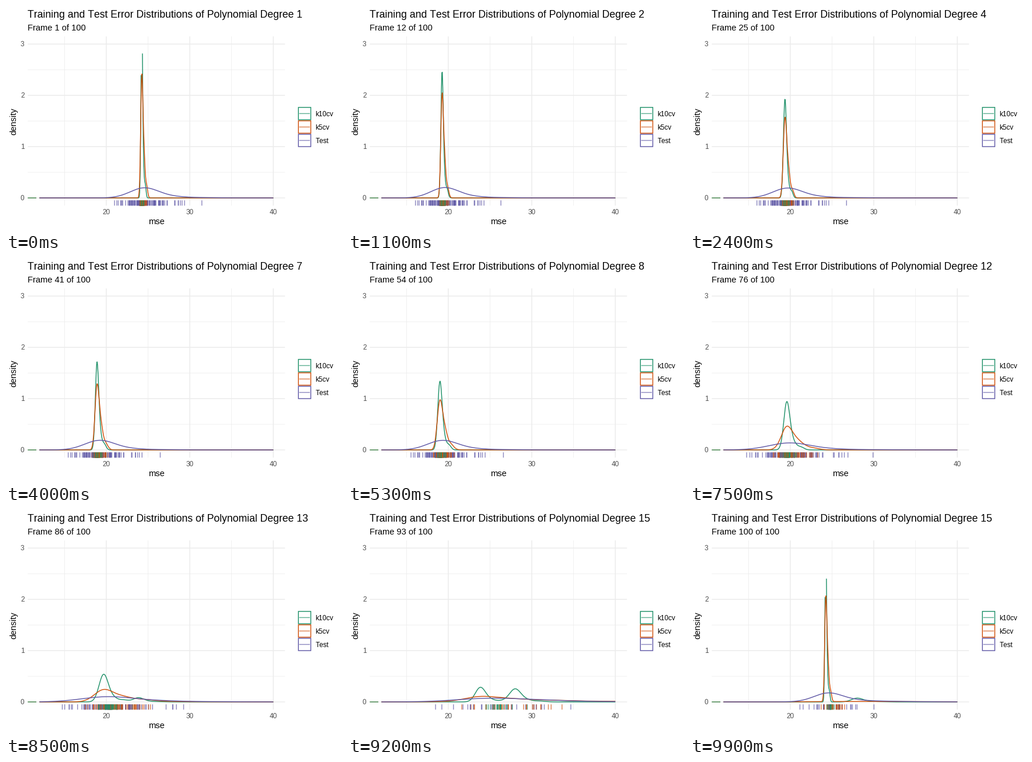
These frames come from a looping animation (576x384 px, 10 s). A matplotlib script:

```python
import numpy as np
import matplotlib.pyplot as plt
from matplotlib.animation import FuncAnimation
from matplotlib.collections import LineCollection
from matplotlib.colors import to_rgba
from matplotlib.patches import Rectangle

plt.rcParams["font.family"] = "Liberation Sans"
plt.rcParams["text.kerning_factor"] = 6

W, H, DPI = 576, 384, 96
FRAMES, DEGREES, REPS = 100, 15, 100
LEFT, RIGHT, TOP, BOTTOM = 37.3, 478.3, 52.1, 342.2
X_MIN, X_MAX, Y_MAX = 12, 40, 3
LINE = 1.42 * 0.75
GRID, GREY = "#EBEBEB", "#4D4D4D"
COLORS = {"k10cv": "#1E9068", "k5cv": "#CF4F0A", "Test": "#5F58A6"}

# error level and peak density at a few degrees, interpolated in between
KNOTS = [1, 2, 4, 6, 8, 10, 13, 15]
CENTRE = [24.25, 19.25, 19.36, 18.87, 18.97, 19.45, 19.68, 28]
PEAK = {"k10cv": [3.6, 2.5, 1.9, 1.8, 1.38, 1.43, .62, .5],
        "k5cv": [2.3, 2, 1.5, 1.32, .97, .72, .27, .06],
        "Test": [.195, .2, .19, .185, .185, .175, .11, .07]}
# offset of the centre, area of the main bump, shoulder and tail heights
SHAPE = {"k10cv": (0, .34, .15, .07),
         "k5cv": (0, .3, .35, .1),
         "Test": (.3, .33, .12, .03)}

grid = np.linspace(X_MIN, X_MAX, 512)


def px(x):
    return LEFT + (RIGHT - LEFT) * ((x - X_MIN) / (X_MAX - X_MIN) + .05) / 1.1


def py(y):
    return BOTTOM - (BOTTOM - TOP) * (y / Y_MAX + .05) / 1.1


def density(name, degree):
    offset, area, shoulder, tail = SHAPE[name]
    peak = np.interp(degree, KNOTS, PEAK[name])
    sd = area / peak
    z = (grid - np.interp(degree, KNOTS, CENTRE) - offset) / sd
    return peak * (np.exp(-z ** 2 / 2)
                   + shoulder * np.exp(-(z - 2) ** 2 / 2)
                   + tail * np.exp(-(z - 4.4) ** 2 / 2))


def build_data():
    rng = np.random.default_rng(17)
    curves, marks = {}, {}
    for name in COLORS:
        ranks = rng.uniform(.005, .995, REPS)
        for d in range(1, DEGREES + 1):
            y = density(name, d)
            kept = int(np.interp(d, [12, 14, 15], [REPS, 80, 25]))
            marks[name, d] = np.interp(ranks[:kept], np.cumsum(y) / y.sum(), grid)
            # values above the y limit leave a gap in the line
            curves[name, d] = np.where(y > Y_MAX, np.nan, y)
    return curves, marks


def build_timeline():
    steps = []
    for d in range(1, DEGREES + 1):
        nxt = d % DEGREES + 1
        steps += [(d, nxt, 0, d)] * (4 if d <= 10 else 3)
        for t in (.25, .5, .75):
            ease = (1 - np.cos(np.pi * t)) / 2
            shown = min(d + 1, DEGREES) if t >= .5 else d
            steps.append((d, nxt, ease, shown))
    return steps


def tween(a, b, ease):
    if ease == 0:
        return a
    n = min(len(a), len(b))
    return a[:n] + (b[:n] - a[:n]) * ease


curves, marks = build_data()
timeline = build_timeline()

fig = plt.figure(figsize=(W / DPI, H / DPI), dpi=DPI, facecolor="white")
ax = fig.add_axes([0, 0, 1, 1])
ax.set_xlim(0, W)
ax.set_ylim(H, 0)
ax.axis("off")


def segment(x, y, color, width=LINE, **kw):
    return ax.plot(x, y, color=color, lw=width, solid_capstyle="butt",
                   snap=False, **kw)[0]


def label(x, y, text, size, color="black", **kw):
    return ax.text(x, y, text, fontsize=size, color=color, **kw)


def draw_axes():
    for v in range(15, 41, 5):
        major = v % 10 == 0
        segment([px(v)] * 2, [TOP, BOTTOM], GRID, LINE if major else LINE / 2)
        if major:
            label(px(v), 357, str(v), 8.8, GREY, ha="center")
    for k in range(7):
        y, major = py(k / 2), k % 2 == 0
        segment([LEFT, RIGHT], [y, y], GRID, LINE if major else LINE / 2)
        if major:
            label(31.5, y + 4.2, str(k // 2), 8.8, GREY, ha="right")
    label((LEFT + RIGHT) / 2, 374, "mse", 11, ha="center")
    label(17.2, (TOP + BOTTOM) / 2, "density", 11, rotation=90, ha="center",
          va="baseline", rotation_mode="anchor")


def draw_legend():
    for i, (name, color) in enumerate(COLORS.items()):
        y = 184.4 + 23.04 * i
        ax.add_patch(Rectangle((501.3, y - 10.6), 21.2, 21.2, fill=False,
                               ec=color, lw=LINE, joinstyle="miter",
                               snap=False))
        segment([502.6, 521], [y, y], color, alpha=.7)
        label(530.4, y + 4.2, name, 8.8)


draw_axes()
draw_legend()
title = label(LEFT, 20, "", 13.2)
subtitle = label(LEFT, 42, "", 11)
lines = {name: segment([], [], color, zorder=3 + i)
         for i, (name, color) in enumerate(COLORS.items())}
rug = LineCollection([], linewidths=LINE, zorder=7, snap=False)
ax.add_collection(rug, autolim=False)
segment([LEFT, 52], [py(0)] * 2, "#3F8246", zorder=7)


def update(i):
    a, b, ease, shown = timeline[i]
    title.set_text("Training and Test Error Distributions of "
                   f"Polynomial Degree {shown}")
    subtitle.set_text(f"Frame {i + 1} of {FRAMES}")
    ticks = []
    for order, name in enumerate(("Test", "k10cv", "k5cv")):
        y = tween(curves[name, a], curves[name, b], ease)
        lines[name].set_data(px(grid), py(y))
        xs = px(tween(marks[name, a], marks[name, b], ease))
        ticks += [(k, order, x, name) for k, x in enumerate(xs)]
    ticks.sort()
    rug.set_segments([[(x, BOTTOM - 9), (x, BOTTOM)] for _, _, x, _ in ticks])
    rug.set_color([to_rgba(COLORS[name], .7) for *_, name in ticks])
    return [title, subtitle, rug, *lines.values()]


anim = FuncAnimation(fig, update, frames=FRAMES, interval=100, repeat=True,
                     repeat_delay=0, blit=False)
plt.show()
```
